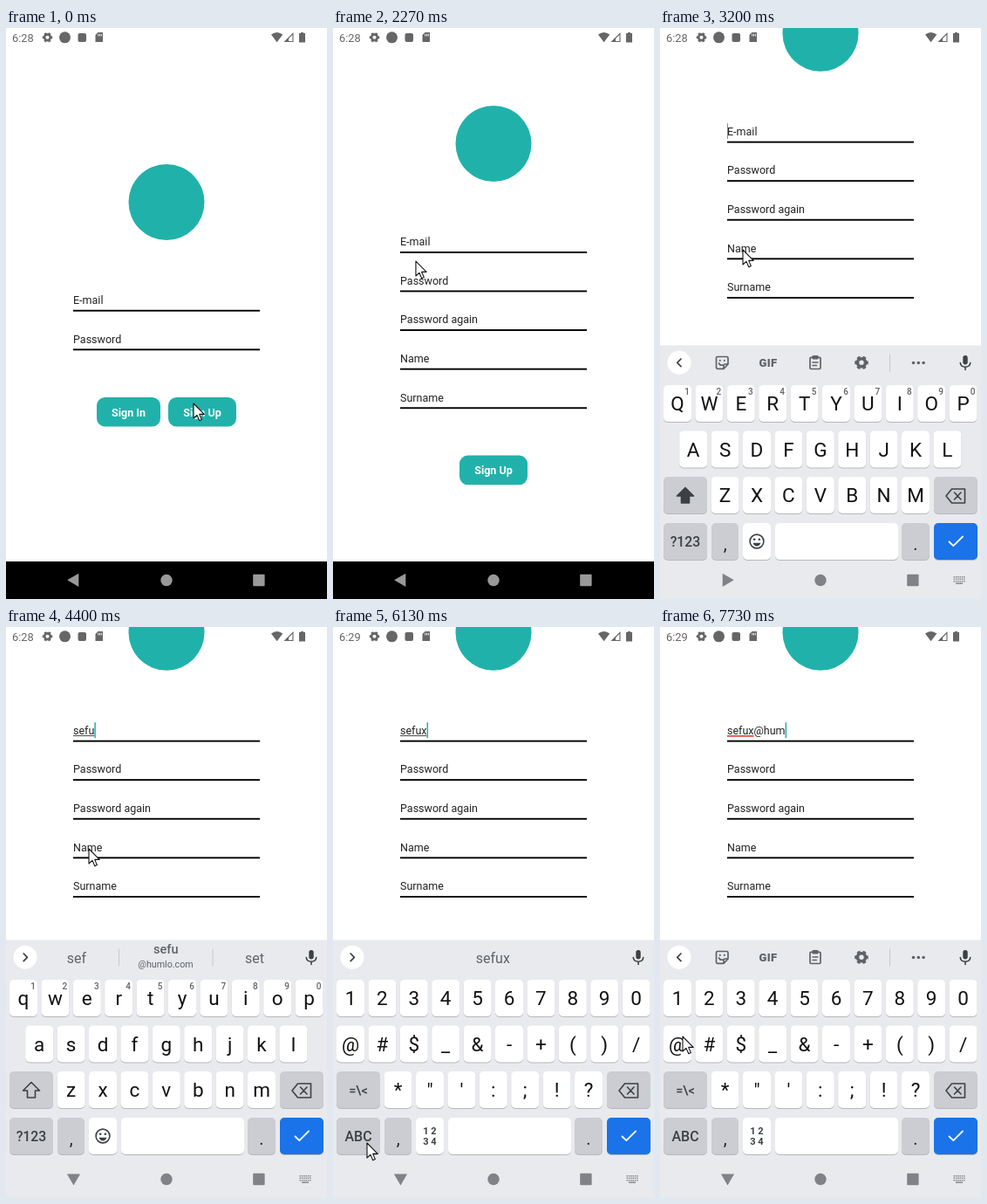
Recreate the animation shown at these times as an HTML page. Size 368 by 654 pixels, loop 8000 ms.

```html
<!DOCTYPE html>
<html lang="en">
<head>
<meta charset="utf-8">
<title>Sign up form</title>
<style>
  html, body { margin: 0; width: 100%; height: 100%; overflow: hidden; background: #fff; }
  svg { display: block; width: 368px; height: 654px; font-family: Roboto, sans-serif; }
  .mid { text-anchor: middle; }
  .bold { font-weight: 700; }
  .semi { font-weight: 500; }
  .line { fill: none; stroke-linecap: round; stroke-linejoin: round; }
</style>
</head>
<body>
<svg id="stage" viewBox="0 0 368 654"></svg>
<script>
const TEAL = '#20b2aa', INK = '#5f6368', DARK = '#3c4043', MOD = '#cbcdd2', STATUS = '#666';
const LOOP = 8000, TICK = 200 / 3, PITCH = 36.4;

const esc = s => s.replace(/&/g, '&amp;').replace(/</g, '&lt;');
const rect = (x, y, w, h, fill, r = 0, more = '') =>
  `<rect x="${x}" y="${y}" width="${w}" height="${h}" rx="${r}" fill="${fill}" ${more}/>`;
const circle = (x, y, r, fill, more = '') => `<circle cx="${x}" cy="${y}" r="${r}" fill="${fill}" ${more}/>`;
const path = (d, fill, more = '') => `<path d="${d}" fill="${fill}" ${more}/>`;
const line = (d, color, w) => `<path class="line" d="${d}" stroke="${color}" stroke-width="${w}"/>`;
const text = (x, y, s, size, fill, cls = '', more = '') =>
  `<text x="${x}" y="${y}" font-size="${size}" fill="${fill}" class="${cls}" ${more}>${esc(s)}</text>`;
const group = (id, ...parts) => `<g id="${id}">${parts.join('')}</g>`;

const gear = (x, y, r, c) =>
  circle(x, y, r * .58, 'none', `stroke="${c}" stroke-width="${r * .46}"`) +
  circle(x, y, r * .85, 'none', `stroke="${c}" stroke-width="${r * .3}" pathLength="60" stroke-dasharray="5.5 4.5" stroke-dashoffset="2.7"`);

// Form
const field = (y, label, id = '') =>
  text(77, y, label, 12.53, '#222', '', id && `id="${id}"`) + rect(77, y + 6.8, 214, 1.9, '#000');
const button = (id, x, y, w, label) =>
  group(id, rect(x, y, w, 33.6, TEAL, 9.5), text(x + w / 2, y + 21.5, label, 12.53, '#fff', 'mid bold'));
const logo = y => circle(184, y, 43.5, TEAL);

const signIn = group('signIn',
  logo(199.5), field(316, 'E-mail'), field(360.6, 'Password'),
  button('inBtn', 104, 423, 73, 'Sign In'), button('upBtn', 186, 423, 78, 'Sign Up'));

const signUp = group('signUp',
  logo(132.5), field(249.2, 'E-mail', 'hint'),
  ['Password', 'Password again', 'Name', 'Surname'].map((s, i) => field(293.7 + i * 44.6, s)).join(''),
  button('okBtn', 145, 489.6, 78, 'Sign Up'),
  group('entry', rect(77, 250.4, 0, 1, '#444', 0, 'id="under"'),
    text(77, 249.2, '', 12.53, '#222', '', 'id="typed"')),
  rect(77, 235.5, 1.4, 18, TEAL, 0, 'id="caret"'));

// Status and navigation bars
const status = group('status',
  text(7, 15.6, '6:28', 12.9, STATUS, '', 'id="clock"'),
  gear(47.5, 10.8, 5.8, STATUS), circle(67.5, 10.8, 6.5, STATUS), rect(82.5, 6, 9.5, 10, STATUS, 2),
  path('M105.5 5H111V16H102.5V8Z', STATUS),
  line('M105.8 7.2V9M107.6 7.2V9M109.4 7.2V9', '#fff', .9),
  path('M304 7.6Q310.5 2.6 317.3 7.6L310.6 16.2Z', STATUS),
  path('M329.5 5V16H318.5Z', STATUS), path('M328.4 7.8V14.9H324V12.2Z', '#fff'),
  path('M338 5H341V6H343V16.5H336V6H338Z', STATUS));

let dots = '';
for (let r = 0; r < 3; r++)
  for (let c = 0; c < 6; c++) dots += rect(336.6 + c * 2.3, 628 + r * 2.5, 1.4, 1.5, 'inherit');
dots = dots.replace(/fill="inherit"/g, '') + '<rect x="339" y="635.5" width="8" height="1.4"/>';

const nav = group('nav',
  '<path id="back" d="M-7.3 0L5.8 -7.6V7.6Z"/>',
  '<circle cx="184" cy="632.5" r="6.7"/><rect x="283.2" y="625.8" width="13.4" height="13.4" rx="1"/>',
  group('imeDots', dots));

// Keyboard
const cap = (x, y, w, fill = '#fff') => rect(x, y + 1, w, 42, '#b4b7bc', 5) + rect(x, y, w, 42, fill, 5);
const key = (cx, y, s) => cap(cx - 16, y, 32) + text(cx, y + 29, s, 22.5, '#111', 'mid');
const row = (x, y, chars) => [...chars].map((s, i) => key(x + i * PITCH, y, s)).join('');
const wide = (y, label, size) => cap(4, y, 50, MOD) + text(29, y + 26.7, label, size, DARK, 'mid semi');

const shift = fill => cap(4, 509, 50, MOD) +
  `<path d="M29 521.5L38.5 531H33.5V539H24.5V531H19.5Z" fill="${fill}" stroke="${DARK}" stroke-width="1.6" stroke-linejoin="round"/>`;
const smile = circle(111, 583, 7.9, 'none', `stroke="${DARK}" stroke-width="1.6"`) +
  circle(108.2, 580.8, 1.3, DARK) + circle(113.8, 580.8, 1.3, DARK) +
  path('M106.6 584.8H115.4Q114 588.6 111 588.6T106.6 584.8Z', DARK);

const letters = (id, fix, arrow) => group(id,
  row(20, 404, fix('qwertyuiop')),
  [...'1234567890'].map((d, i) => text(31 + i * PITCH, 414.6, d, 10, INK, 'mid semi')).join(''),
  row(38.2, 456.5, fix('asdfghjkl')), shift(arrow), row(74.6, 509, fix('zxcvbnm')),
  wide(562, '?123', 15.8), cap(95, 562, 32), smile);

const symbols = group('symbols',
  row(20, 404, '1234567890'), row(20, 456.5, '@#$_&-+()/'),
  wide(509, '=\\<', 14.5), row(74.6, 509, '*"\':;!?'), wide(562, 'ABC', 16), cap(95, 562, 32),
  text(111, 581, '1 2', 11, DARK, 'mid bold'), text(111, 593, '3 4', 11, DARK, 'mid bold'));

const shared =
  cap(314, 509, 50, MOD) +
  line('M334.5 523H349.5V539H334.5L328 531ZM337.5 527L345 535M345 527L337.5 535', DARK, 1.6) +
  cap(59, 562, 31, MOD) + text(74.6, 593, ',', 20, '#222', 'mid') +
  cap(132, 562, 141) + cap(277, 562, 32, MOD) + text(293, 593, '.', 20, '#222', 'mid') +
  cap(314, 562, 50, '#1a73e8') + line('M331.5 583.5L336.3 588.2L347 577.5', '#fff', 1.8);

const divider = x => rect(x, 368.5, 1, 20, '#c6c9cd');
const tools = group('tools',
  line('M24 374L19.8 378.3L24 382.6', DARK, 1.7),
  line('M78 380V373Q78 371.5 76.5 371.5H66Q64.5 371.5 64.5 373V384Q64.5 385.3 66 385.3H73ZM78 380H74.5Q73 380 73 381.5V385.3M67.5 379Q69 382 72 381', INK, 1.7),
  circle(68.8, 375.8, 1.1, INK), circle(73.8, 375.8, 1.1, INK),
  text(124, 383, 'GIF', 13, INK, 'mid', 'font-weight="900" letter-spacing=".4"'),
  rect(172, 372.3, 12, 13.2, 'none', 1.2, `stroke="${INK}" stroke-width="1.7"`),
  rect(174.5, 370, 7, 4.6, INK, 1), line('M175 378H181M175 381.6H179.5', INK, 1.5),
  gear(231, 378.3, 7.8, INK), divider(263),
  [290.5, 296.3, 302.1].map(x => circle(x, 378.5, 1.8, INK)).join(''));

const words = group('words',
  line('M20.2 374L24.4 378.3L20.2 382.6', DARK, 1.7),
  group('bars', divider(129), divider(236.5)),
  ['left', 'main', 'sub', 'right'].map((id, i) =>
    text([81, 183.3, 183, 285][i], [384.5, 384.5, 389.5, 384.5][i], '', i == 2 ? 10.7 : 16, INK, 'mid', `id="${id}"`)).join(''));

const mic = rect(347.3, 370, 5.4, 10.5, DARK, 2.7) + line('M344.3 378.5Q344.6 383.2 350 383.2T355.7 378.5M350 383.5V386.5', DARK, 1.6);

const popup = group('popup',
  rect(0, 397, 41, 56, '#b4b7bc', 6), rect(0, 396, 40, 56, '#fff', 6), text(20, 431, '@', 26, '#111', 'mid'));

const keyboard = group('keyboard',
  rect(0, 358.5, 368, 300, '#e8eaed'), circle(22, 378.3, 13.5, '#fff'), tools, words, mic,
  letters('upper', s => s.toUpperCase(), DARK), letters('lower', s => s, 'none'), symbols, shared, popup);

document.getElementById('stage').innerHTML =
  rect(0, 0, 368, 654, '#fff') + signIn + signUp + status +
  rect(0, 358.5, 368, 260, '#fff', 0, 'id="cover"') + rect(0, 611, 368, 43, '#000') + keyboard + nav +
  '<path id="mouse" d="M0 0V17L4 13.4L6.8 19.8L9.4 18.6L6.7 12.4H12.2Z" fill="#fff" stroke="#111" stroke-width="1.1" stroke-linejoin="round"/>';

// Timeline: each entry starts at its first value, in ms
const TYPED = [[0, ''], [3470, 's'], [4070, 'se'], [4200, 'sef'], [4330, 'sefu'], [4600, 'sefux'],
  [6670, 'sefux@'], [7270, 'sefux@h'], [7600, 'sefux@hu'], [7730, 'sefux@hum']];
const WORDS = [[0, '', '', '', ''], [3600, 's', 'so', '', 'she'], [4130, 'se', 'see', '', 'set'],
  [4400, 'sef', 'sefu', '@humlo.com', 'set'], [4670, 'sefu', 'sefu', '@humlo.com', 'setup'],
  [4870, '', 'sefux', '', ''], [6670, '', '', '', '']];
const SLIDE = [[0, 300, 0], [3070, 211, .13], [3130, 60, .75], [3200, 5, 1], [3270, 1, 1], [3330, 0, 1]];
const TURN = [[0, 0], [3200, 180], [3270, 225], [3330, 270]];
const CARET = [[0, 0], [2930, 1], [5330, 0], [5800, 1], [6330, 0], [6670, 1]];
const MOUSE = [[0, 215, 430], [70, 215, 438], [800, 215, 438], [1070, 174, 321], [1930, 174, 321],
  [2330, 81, 257.5], [2400, 81, 257.5], [2470, 95, 254], [5270, 95, 254], [5470, 92, 253.5],
  [5670, 92, 253.5], [5930, 40, 607], [6070, 39, 591], [6130, 39, 591], [6470, 26, 469], [LOOP, 26, 469]];

const at = (list, t) => list.filter(e => e[0] <= t).pop().slice(1);
const glide = (list, t) => {
  const i = Math.max(1, list.findIndex(e => e[0] >= t));
  const [a, b] = [list[i - 1], list[i]], p = (t - a[0]) / (b[0] - a[0]);
  return [1, 2].map(n => a[n] + (b[n] - a[n]) * p);
};

const ui = {};
document.querySelectorAll('[id]').forEach(e => ui[e.id] = e);
const show = (id, on) => ui[id].style.display = on ? '' : 'none';
const set = (id, attrs) => Object.entries(attrs).forEach(([k, v]) => ui[id].setAttribute(k, v));

function draw(t) {
  const [typed] = at(TYPED, t), [drop, alpha] = at(SLIDE, t), [turn] = at(TURN, t);
  const words = at(WORDS, t), sym = t >= 6000, marked = t >= 6670;

  show('signIn', t < 870);
  show('signUp', t >= 870);
  set('upBtn', { opacity: t >= 530 ? .2 : 1 });
  set('signUp', { transform: `translate(0 ${t >= 3130 ? -126.3 : 0})` });
  show('cover', t >= 3000);
  ui.clock.textContent = t < 4600 ? '6:28' : '6:29';

  show('hint', !typed);
  ui.typed.textContent = typed.split('@')[0];
  const stem = ui.typed.getComputedTextLength();
  ui.typed.textContent = typed;
  const width = typed ? ui.typed.getComputedTextLength() : 0;
  set('under', { width: stem, height: marked ? 1.6 : 1, fill: marked ? '#e5392f' : '#444' });
  set('caret', { x: 77 + width, fill: typed ? TEAL : '#888', width: typed ? 1.5 : 1 });
  show('caret', at(CARET, t)[0]);

  set('keyboard', { transform: `translate(0 ${drop})`, opacity: alpha });
  show('keyboard', alpha);
  show('upper', t < 3470);
  show('lower', t >= 3470 && !sym);
  show('symbols', sym);
  show('popup', t == 6670);
  const tooled = t < 3600 || t >= 6870;
  show('tools', tooled);
  show('words', !tooled);
  show('bars', t < 4870);
  ['left', 'main', 'sub', 'right'].forEach((id, i) => ui[id].textContent = words[i]);
  set('main', words[2] ? { y: 374, 'font-size': 14.5, 'font-weight': 500 } : { y: 384.5, 'font-size': 16, 'font-weight': 400 });

  set('nav', { fill: alpha == 1 ? '#808287' : '#999' });
  set('back', { transform: `translate(77.5 632.3) rotate(${turn})` });
  show('imeDots', alpha);
  set('mouse', { transform: `translate(${glide(MOUSE, t)})` });
}

const start = performance.now();
function tick() {
  const t = (performance.now() - start) % LOOP;
  draw(Math.round(Math.floor(t / TICK + .06) * TICK / 10) * 10);
  requestAnimationFrame(tick);
}
tick();
</script>
</body>
</html>
```
